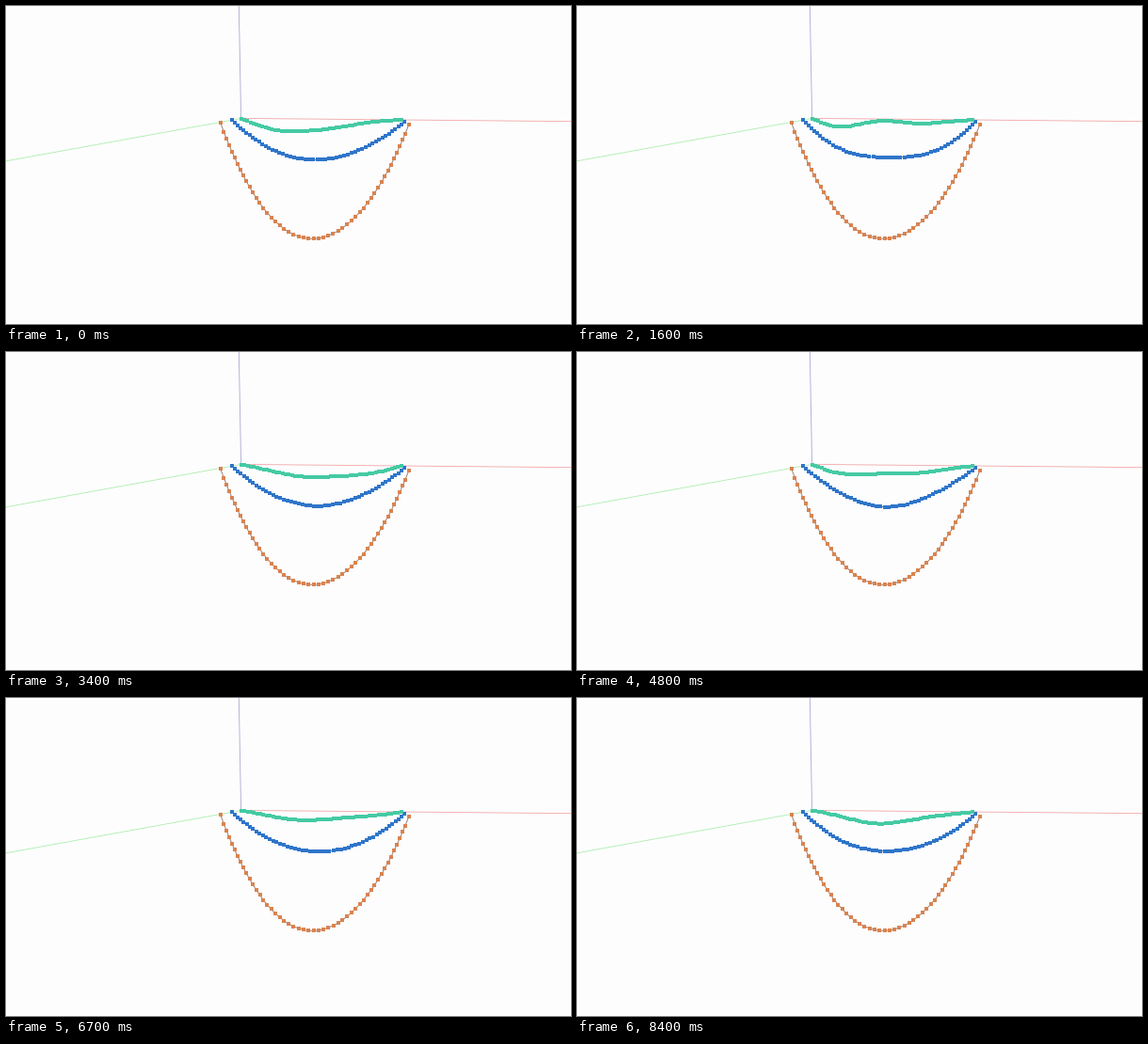
A matplotlib script that plays this animation: 600 px wide and 338 px high, repeating every 8.5 s.

```python
import numpy as np
import matplotlib.pyplot as plt
from matplotlib.animation import FuncAnimation

W, H, DPI = 600, 338, 100
FRAMES, STEP = 85, 100
PX = 72 / DPI  # one pixel in points
TAU = 2 * np.pi

# Sine mode strengths of the taut rope at a few moments (seconds)
TIMES = np.array([0, 1.6, 3.4, 4.8, 5.8, 6.7, 8.4])
MODES = np.array([
    [11.5, 4.9, 12.8, 10.3, 10.3, 9.0, 11.4],
    [4.2, 1.8, -0.3, 2.0, 1.0, 1.2, 2.0],
    [0.4, 2.9, 0.3, 1.3, -1.6, 0.1, -1.1],
    [0.5, 1.7, -0.6, 0.9, -1.3, -0.4, -0.6],
]).T
SLOPES = np.gradient(MODES, TIMES, axis=0)

U = np.linspace(0, 1, 400)
SHAPES = np.sin(np.pi * np.outer(np.arange(1, 5), U))


def modes_at(t):
    """Hermite path through the mode strengths, with a ripple in between."""
    i = min(np.searchsorted(TIMES, t, side="right") - 1, len(TIMES) - 2)
    h = TIMES[i + 1] - TIMES[i]
    p = (t - TIMES[i]) / h
    modes = ((1 + 2 * p) * (1 - p) ** 2 * MODES[i]
             + p * (1 - p) ** 2 * h * SLOPES[i]
             + p * p * (3 - 2 * p) * MODES[i + 1]
             + p * p * (p - 1) * h * SLOPES[i + 1])
    modes[1] += 0.9 * np.sin(np.pi * p) ** 2 * np.sin(7 * t)
    return modes


def beads(start, end, drop, stretch=0.0, gap=1.0):
    """Place 51 beads along a rope hanging by `drop` under its chord."""
    x = start[0] + (end[0] - start[0]) * U
    y = start[1] + (end[1] - start[1]) * U + drop
    mid = np.abs(U[1:] + U[:-1] - 1)
    length = np.hypot(np.diff(x), np.diff(y)) / (1 + stretch * mid)
    s = np.concatenate([[0], np.cumsum(length)])
    gaps = np.ones(50)
    gaps[0], gaps[-1] = gap, 0.9 * gap + 0.1
    at = np.concatenate([[0], np.cumsum(gaps)])
    at *= s[-1] / at[-1]
    return np.interp(at, s, x), np.interp(at, s, y)


def taut_rope(t):
    return beads((250, 119.5), (419.5, 121.2), modes_at(t) @ SHAPES)


def middle_rope(t):
    flat = 3.2 * np.exp(-t / 5) * np.sin(TAU * t / 6.4)
    skew = 0.6 + 0.7 * np.cos(TAU * t / 4.6)
    drop = (41 * 4 * U * (1 - U) + skew * np.sin(TAU * U)
            + flat * np.sin(3 * np.pi * U))
    return beads((240, 121.3), (423, 123.3), drop)


def slack_rope(t):
    d = 2 * U - 1
    k = 1.87
    chain = (np.cosh(k) - np.cosh(k * d)) / (np.cosh(k) - 1)
    skew = 2.2 + 0.2 * np.sin(TAU * t / 1.7)
    drop = 122.8 * (0.7 * (1 - d * d) + 0.3 * chain) + skew * np.sin(TAU * U)
    return beads((227.5, 123.5), (428, 125.5), drop, stretch=0.45, gap=1.5)


fig = plt.figure(figsize=(W / DPI, H / DPI), dpi=DPI, facecolor="#fdfdfe")
ax = fig.add_axes([0, 0, 1, 1])
ax.set_xlim(0, W)
ax.set_ylim(H, 0)
ax.axis("off")


def line(x, y, color):
    ax.plot(x, y, color=color, lw=0.9 * PX, zorder=1)


line([0, W], [337.5, 337.5], "#f3f3f4")
line([247.3, 249.6], [0, 119.5], "#adadd4")
line([0, 249.6], [164.8, 119.5], "#b0efb0")
line([249.6, W], [119.4, 122.7], "#f2abab")


def rope(color, link, size, z):
    return ax.plot([], [], "-s", color=link, lw=0.9 * PX, ms=size * PX,
                   mfc=color, mec="none", mew=0, snap=False, zorder=z)[0]


ropes = [
    (rope("#d98350", "#94786a", 3.8, 2), slack_rope),
    (rope("#2f75c9", "#3c648f", 3.8, 3), middle_rope),
    (rope("#45caa4", "#4f9f88", 3.7, 4), taut_rope),
]


def draw(frame):
    t = frame * STEP / 1000
    for artist, pose in ropes:
        artist.set_data(*pose(t))
    return [artist for artist, _ in ropes]


anim = FuncAnimation(fig, draw, frames=FRAMES, interval=STEP,
                     init_func=lambda: draw(0), repeat=True, repeat_delay=0)
plt.show()
```
